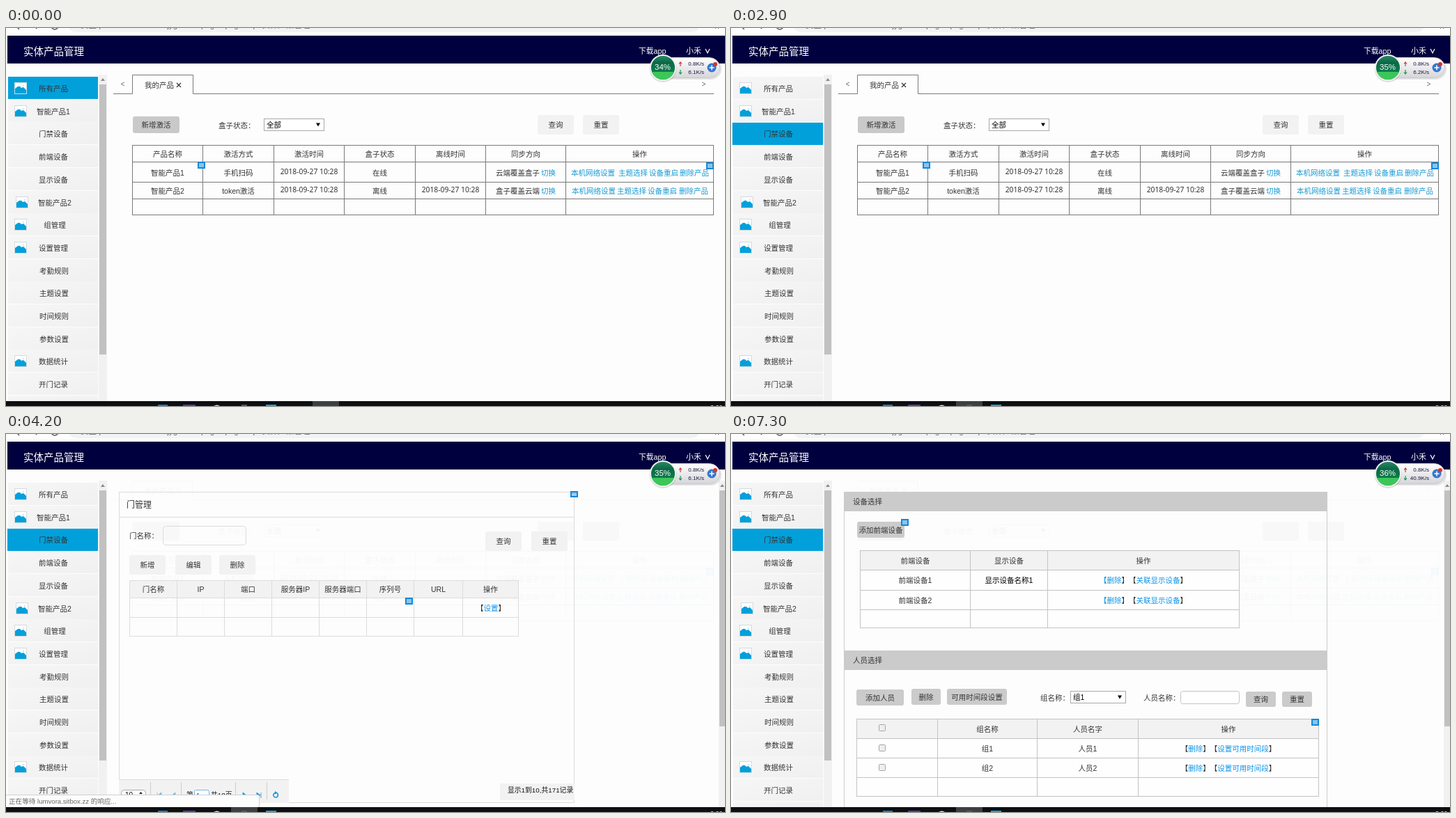
Animation of 1032x543 px, one loop 8000 ms. Source, as an HTML page:

```html
<!DOCTYPE html>
<html lang="zh-CN">
<head>
<meta charset="utf-8">
<title>管理后台</title>
<style>
  html, body { margin: 0; width: 100%; height: 100%; overflow: hidden; background: #fdfdfd; }
  svg { display: block; width: 100%; height: 100%; }
  text {
    font-family: 'Liberation Sans', 'Noto Sans CJK SC', 'Noto Sans CJK', sans-serif;
    white-space: pre; text-spacing-trim: space-all; font-feature-settings: 'chws' 0, 'halt' 0;
  }
</style>
</head>
<body>
<svg id="stage" viewBox="0 0 1032 543"></svg>
<script>
const LOOP = 8000, BLUE = '#02a0db', LINK = '#169bd5', AZURE = '#0a94ea';

// Drawing helpers: each returns SVG markup. Text is placed by its vertical centre.
const rect = (x, y, w, h, fill, stroke, r = 0) => {
  const o = stroke ? .5 : 0;
  return `<rect x="${x + o}" y="${y + o}" width="${w}" height="${h}" rx="${r}" fill="${fill}" stroke="${stroke || 'none'}"/>`;
};
const circle = (x, y, r, fill, stroke = 'none', w = 1) =>
  `<circle cx="${x}" cy="${y}" r="${r}" fill="${fill}" stroke="${stroke}" stroke-width="${w}"/>`;
const path = (d, fill, stroke = 'none', w = 1) =>
  `<path d="${d}" fill="${fill}" stroke="${stroke}" stroke-width="${w}"/>`;
const text = (x, y, s, { size = 10.5, fill = '#333', anchor = 'middle', extra = '' } = {}) =>
  `<text x="${x}" y="${y + size * .37}" font-size="${size}" fill="${fill}" text-anchor="${anchor}" ${extra}>${s}</text>`;
const left = (x, y, s, o = {}) => text(x, y, s, { ...o, anchor: 'start' });
const group = (id, ...parts) => `<g id="${id}">${parts.flat().join('')}</g>`;
const span = (fill, s) => `<tspan fill="${fill}">${s}</tspan>`;
const button = (x, y, w, h, label, fill = '#f2f2f2') =>
  rect(x, y, w, h, fill, '', 3) + text(x + w / 2, y + h / 2 + .5, label);
const select = (x, y, w, label) => rect(x, y, w, 17, '#fff', '#a9a9a9') +
  left(x + 4, y + 9.5, label, { fill: '#000' }) + path(`M${x + w - 11} ${y + 6.5}h6l-3 5z`, '#000');
const note = (x, y, h = 10) => rect(x, y, 11, h, '#1388d8') +
  [.28, .5, .72].map(k => rect(x + 2, Math.round(y + h * k) - .5, 7, 1, '#fff')).join('');
const grid = (xs, ys, stroke, head = 'none', body = 'none') => {
  const [x0, x1, y0, y1] = [xs[0], xs.at(-1), ys[0], ys.at(-1)];
  const d = ys.map(y => `M${x0} ${y + .5}H${x1 + 1}`).join('') + xs.map(x => `M${x + .5} ${y0}V${y1}`).join('');
  return rect(x0, ys[1], x1 - x0, y1 - ys[1], body) + rect(x0, y0, x1 - x0, ys[1] - y0, head) + path(d, 'none', stroke);
};
const cells = (xs, y, labels, o) =>
  labels.map((s, i) => s && text((xs[i] + xs[i + 1]) / 2 + .5, y, s, o)).join('');
const scrollbar = (x, w, id, thumbH) => rect(x, 67, w, 469, '#f1f1f1') +
  path(`M${x + w / 2 - 3} 76h6l-3 -4z`, '#8a8a8a') +
  `<rect id="${id}" x="${x + 1}" y="81" width="10" height="${thumbH}" fill="#c1c1c1"/>`;

function chrome() {
  const grey = { fill: '#666', size: 11.5 };
  return rect(90, -16, 905, 22, '#f1f3f4', '', 10) +
    left(107, -4, '安全 | lumvora.sitbox.zz/jyg/index/pages.p#g=1&amp;p=实体产品管理', grey) +
    path('M14 -3l5 5M47 -3l-4 4', 'none', '#555', 1.4) + path('M65 -3a5 5 0 0 0 10 0', 'none', '#555', 1.4) +
    path('M1016 -2l3 3M1025 -2l-3 3', 'none', '#666') +
    rect(2, 11, 1030, 40, '#00003e') +
    left(25, 34, '实体产品管理', { size: 14.5, fill: '#fff' }) +
    left(908, 33, '下载app', { fill: '#fff', size: 10.8 }) +
    left(976, 33, '小禾', { fill: '#fff', size: 11 }) + path('M1004 30l3 6l3 -6', 'none', '#fff', 1.2);
}

const MENU = ['*所有产品', '*智能产品1', '门禁设备', '前端设备', '显示设备', '*智能产品2', '*组管理', '*设置管理',
  '考勤规则', '主题设置', '时间规则', '参数设置', '*数据统计', '开门记录', ''];

function sidebar() {
  const top = i => Math.round(70 + i * 32.7);
  const rows = MENU.map((_, i) => rect(3, top(i), 129, i === 14 ? 8 : 32, 'url(#item)'));
  const labels = MENU.map((s, i) => {
    const y = top(i) + 17, shift = i === 5 || i === 6 ? 2 : i > 7 && i < 12 ? 1 : 0;
    const x = i === 5 ? 14 : 12, icon = s[0] === '*';
    return (icon ? rect(x, y - 9, 17, 16, '#fff', '#d3dadd') +
      path(`M${x + 1} ${y + 7}v-7l4 -3q3 -1 5 2l3 -1l4 4v5z`, BLUE) +
      circle(x + 13, y - 4, 1.2, '#cfe6f0') : '') +
      text(68 + shift, y, s.replace('*', ''));
  });
  return rows.join('') + group('pickAll', rect(3, 70, 129, 32, BLUE)) +
    group('pickDoor', rect(2, 136, 130, 32, BLUE)) + labels.join('') + scrollbar(133, 12, 'thumb', 388);
}

function productPage() {
  const xs = [181, 282, 384, 485, 587, 688, 803, 1015], line = '#797979';
  const date = (x, y) => text(x, y, '2018-09-27 10:28',
    { size: 10.3, extra: `style="font-family:'Noto Sans',sans-serif"` });
  const link = (x, y, s) => left(x, y, s, { fill: LINK });
  const actions = (y, at) => ['本机网络设置', '主题选择', '设备重启', '删除产品'].map((s, i) => link(at[i], y, s)).join('');
  return path('M154 94.5H181.5V67.5H268.5V94.5H1016', 'none', line) +
    path('M170 78l-5 2.5l5 2.5M999 78l5 2.5l-5 2.5', 'none', '#777') +
    left(199, 82, '我的产品') + path('M245 79l6 6m0 -6l-6 6', 'none', '#333', 1.2) +
    button(182, 127, 67, 24, '新增激活', '#c9c9c9') + left(305, 140, '盒子状态：') + select(370, 130, 86, '全部') +
    button(763, 125, 52, 28, '查询') + button(828, 125, 52, 28, '重置') +
    grid(xs, [168, 192, 221, 245, 268], line) +
    cells(xs, 181, ['产品名称', '激活方式', '激活时间', '盒子状态', '离线时间', '同步方向', '操作']) +
    cells(xs, 208, ['智能产品1', '手机扫码', '', '在线']) + cells(xs, 234, ['智能产品2', 'token激活', '', '离线']) +
    date(435, 206) + date(435, 232) + date(638, 232) +
    left(703, 208, '云端覆盖盒子') + link(768, 208, '切换') + left(703, 234, '盒子覆盖云端') + link(768, 234, '切换') +
    actions(208, [811, 879, 923, 967]) + actions(234, [812, 877, 921, 966]) + note(275, 192) + note(1005, 193);
}

const residue = () => [[182, 67], [763, 52], [828, 52]].map(([x, w]) => rect(x, 126, w, 27, '#f8f8f8')).join('');

function doorPage() {
  const xs = [177, 245, 313, 381, 449, 517, 585, 655, 735], line = '#dcdcdc';
  const buttons = [[688, 140, '查询'], [754, 140, '重置'], [177, 174, '新增'], [243, 174, '编辑'], [306, 174, '删除']];
  const bold = { fill: '#111', size: 9.8, extra: 'font-weight="500"' };
  return rect(162, 83, 653, 446, 'none', line) + path('M162 119.5H816', 'none', line) +
    left(173, 102, '门管理', { size: 12 }) + note(810, 82, 9) +
    left(177, 146, '门名称：') + rect(225, 132, 119, 27, 'none', line, 4) +
    buttons.map(([x, y]) => rect(x, y, 52, 28, '#f2f2f2', '', 3)).join('') +
    group('doorLabels', buttons.map(([x, y, s]) => text(x + 26, y + 14.5, s))) +
    grid(xs, [210, 235, 263, 290], line, '#f2f2f2') +
    cells(xs, 223.5, ['门名称', 'IP', '端口', '服务器IP', '服务器端口', '序列号', 'URL', '操作']) +
    text(696, 250, `【${span(AZURE, '设置')}】`) + note(573, 235) +
    rect(162, 497, 244, 33, '#f2f2f2') + path('M162 496.5H406', 'none', line) +
    path([207, 251, 329, 374].map(x => `M${x + .5} 500v25`).join(''), 'none', '#ccc') +
    rect(165, 511, 35, 14, '#fff', '#aaa', 4) + left(171, 518.5, '10', { size: 10, fill: '#111' }) +
    path('M191 517l2.5 -3l2.5 3zM191 520l2.5 3l2.5 -3z', '#222') +
    path('M217 515v8M223 515v8l-5 -4zM243 515v8l-5 -4z', '#6db9e8', '#6db9e8', .8) +
    path('M340 515v8l5 -4zM360 515v8l5 -4zM366 515v8', '#1296db', '#1296db', .8) +
    path('M389 516a3.3 3.3 0 1 1 -3 -.4', 'none', '#1296db', 1.6) + path('M386 513l4 2.5l-4 2z', '#1296db') +
    left(259, 518, '第', bold) + rect(270, 511, 21, 13, '#fff', '#79b4e2', 2) + left(273, 518.5, '1', { size: 9.5 }) +
    left(294, 518, '共18页', bold) +
    rect(709, 502, 107, 24, '#f2f2f2') + left(720, 511, '显示1到10,共171记录', bold);
}

function devicePage() {
  const line = '#c3c3c3', top = [185, 343, 454, 729], low = [180, 296, 439, 584, 843];
  const ops = (x, y, s) => text(x, y, `${span(AZURE, '【删除')}】【${span(AZURE, s)}】`);
  const plain = (x, y, s) => text(x, y, `【${span(AZURE, '删除')}】【${span(AZURE, s)}】`);
  const grey = (x, y, w, h, s) => button(x, y, w, h, s, '#cbcbcb');
  return path('M162.5 83V536M855.5 83V536', 'none', '#ccc') +
    [[83, '设备选择'], [311, '人员选择']].map(([y, s]) => rect(162, y, 694, 28, '#cbcbcb') + left(175, y + 14.5, s)).join('') +
    grey(181, 126, 68, 23, '添加前端设备') + note(244, 122) +
    grid(top, [167, 195, 224, 252, 278], line, '#f2f2f2', '#fefefe') +
    cells(top, 182, ['前端设备', '显示设备', '操作']) +
    cells(top, 210, ['前端设备1', span('#000', '显示设备名称1')]) + cells(top, 239, ['前端设备2']) +
    ops(592, 210, '关联显示设备') + ops(592, 239, '关联显示设备') +
    grey(180, 367, 68, 23, '添加人员') + grey(259, 366, 42, 23, '删除') + grey(310, 366, 86, 23, '可用时间段设置') +
    left(444, 379, '组名称：') + select(487, 369, 79, '组1') +
    left(592, 379, '人员名称：') + rect(645, 369, 84, 18, '#fff', '#c3c3c3', 3) +
    grey(739, 370, 43, 22, '查询') + grey(791, 370, 43, 22, '重置') +
    grid(low, [409, 437, 465, 493, 520], line, '#f2f2f2', '#fefefe') +
    cells(low, 424, ['', '组名称', '人员名字', '操作']) +
    cells(low, 452, ['', '组1', '人员1']) + cells(low, 480, ['', '组2', '人员2']) +
    plain(714, 452, '设置可用时间段') + plain(714, 480, '设置可用时间段') +
    [417, 446, 474].map(y => rect(212, y, 9, 9, '#eee', '#a6a6a6', 1)).join('') + note(833, 409);
}

function badge() {
  const speed = (id, y) => `<text id="${id}" x="1002" y="${y}" font-size="8" fill="#16163c" text-anchor="end"></text>`;
  return rect(930, 44, 97, 30, 'rgba(0,0,0,.1)', '', 15) + rect(936, 42, 88, 29, 'url(#pill)', '#c9c9cd', 15) +
    circle(943, 58.5, 19.5, 'rgba(0,0,0,.12)') + circle(943, 57, 18, 'url(#globe)', '#eef2ef', 2) +
    path('M927 63H959A17 17 0 0 1 927 63z', '#3cc65a') +
    '<text id="percent" x="942.5" y="60" font-size="11.5" fill="#fff" text-anchor="middle"></text>' +
    path('M968 55v-6m-2 2.5l2 -2.5l2 2.5', 'none', '#d5383c', 1.2) +
    path('M968 60v6m-2 -2.5l2 2.5l2 -2.5', 'none', '#1d9650', 1.2) + speed('up', 54) + speed('down', 66) +
    circle(1013, 57, 6.5, '#3576cf') + path('M1009.5 57h7M1013 53.5v7', 'none', '#fff', 1.5) +
    circle(1018, 52, 3, '#d9332e');
}

function taskbar() {
  return rect(0, 536, 1032, 7, '#0d0f10') + group('task', rect(0, 536, 38, 7, '#3d4042')) +
    rect(218, 541, 14, 2, '#1678c8') + rect(254, 541, 18, 2, '#6b2fa0') + rect(373, 541, 15, 2, '#1b9fdd') +
    path('M298 543q5 -3 9 0z', '#ddd') + rect(338, 541, 8, 2, '#555') +
    left(1011, 545, '2:00', { size: 9, fill: '#fff' });
}

const stage = document.getElementById('stage');
stage.innerHTML = `<defs>
  <linearGradient id="item" x2="1" y2="1"><stop stop-color="#f6f6f6"/><stop offset="1" stop-color="#f0f0f0"/></linearGradient>
  <linearGradient id="pill" x2="0" y2="1"><stop stop-color="#fff"/><stop offset="1" stop-color="#d6d6da"/></linearGradient>
  <linearGradient id="globe" x2="0" y2="1"><stop stop-color="#2f8a68"/><stop offset=".3" stop-color="#0a6a46"/><stop offset="1" stop-color="#128a52"/></linearGradient>
  </defs>` + chrome() + sidebar() + group('products', productPage()) + group('residue', residue()) +
  group('side', scrollbar(1023, 10, 'sideThumb', 339)) + group('door', doorPage()) + group('device', devicePage()) +
  group('status', rect(-1, 518, 364, 18, '#fdfdfd', '#d0d0d0', 2),
    left(4, 527.5, '正在等待 lumvora.sitbox.zz 的响应...', { size: 9.6, fill: '#666' })) +
  taskbar() + badge();

// Each row: [start in ms, value].
const OPACITY = {
  pickAll: [[0, 1], [2800, 0]],
  pickDoor: [[0, 0], [2800, 1]],
  products: [[0, 1], [3100, .4], [3200, .03]],
  residue: [[0, 0], [3200, 1]],
  side: [[0, 0], [3700, 1]],
  door: [[0, 0], [3700, .25], [3800, .5], [3900, .75], [4000, 1], [6100, 0]],
  doorLabels: [[0, .6], [4200, 1]],
  device: [[0, 0], [6100, 1]],
  status: [[0, 0], [3100, .5], [3200, 1], [4400, .75], [4500, .5], [4600, .25], [4700, 0]],
};
const THUMB = [[0, '#c1c1c1'], [1100, '#a8a8a8'], [1300, '#c1c1c1'], [7200, '#a8a8a8'], [7300, '#c1c1c1']];
const TASK_X = [[0, 440], [2800, 323]];
const METER = [[0, '34 0.8 6.1'], [800, '34 0.7 6.3'], [1700, '35 0.8 6.1'], [2600, '35 0.8 6.2'], [3500, '35 0.8 6.1'],
  [4400, '36 0.9 42.5'], [5400, '36 0.8 40.9'], [6300, '36 1.2 38.4'], [7200, '36 0.8 40.9']];

const at = (steps, t) => steps.findLast(([start]) => start <= t)[1];
const el = id => document.getElementById(id);

function draw(t) {
  for (const id in OPACITY) el(id).setAttribute('opacity', at(OPACITY[id], t));
  el('thumb').setAttribute('fill', at(THUMB, t));
  el('task').setAttribute('transform', `translate(${at(TASK_X, t)})`);
  const [percent, up, down] = at(METER, t).split(' ');
  el('percent').textContent = percent + '%';
  el('up').textContent = up + 'K/s';
  el('down').textContent = down + 'K/s';
}

const begin = performance.now();
(function tick() {
  draw((performance.now() - begin) % LOOP);
  requestAnimationFrame(tick);
})();
</script>
</body>
</html>
```
